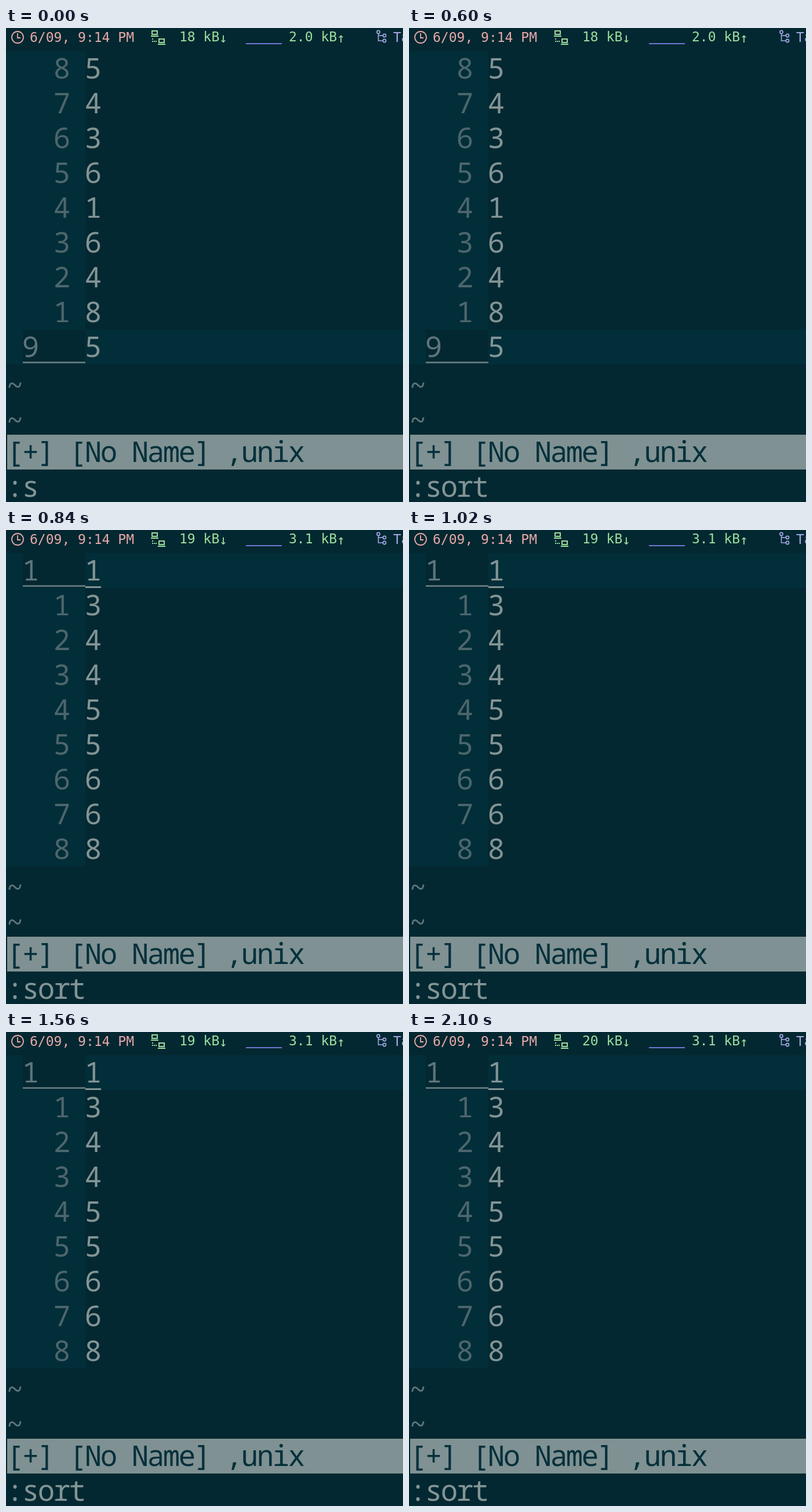
An HTML page with a canvas for the animation above (2.16 s loop, 685 by 817 pixels).

```html
<!DOCTYPE html>
<html lang="en">
<head>
<meta charset="utf-8">
<title>Sorting lines</title>
<style>
html, body { margin: 0; width: 100%; height: 100%; overflow: hidden; background: #032831; }
canvas { display: block; }
</style>
</head>
<body>
<canvas id="stage" width="685" height="817"></canvas>
<script>
const ctx = document.getElementById('stage').getContext('2d');
const LOOP = 2160, SORT_AT = 660;
const CELL = 27, ROW = 60, LEFT = 2, TOP = 40;
const BIG = '300 49px "Noto Sans Mono", "DejaVu Sans Mono", monospace';
const SMALL = '23px "DejaVu Sans Mono", monospace';
const C = {
  bg: '#032831', shade: '#022e39', text: '#839495', dim: '#4c666c', current: '#5d757a',
  status: '#7f9192', statusText: '#04303b',
  pink: '#e6a9a9', green: '#9bdf9d', lilac: '#a5a9e6', graph: '#7077d2'
};
const values = [5, 4, 3, 6, 1, 6, 4, 8, 5];
const sorted = [...values].sort((a, b) => a - b);

function box(x, y, w, h, color) {
  ctx.fillStyle = color;
  ctx.fillRect(x, y, w, h);
}

// Each character sits in the middle of its terminal cell.
function cells(str, col, row, color, dy = 0) {
  ctx.font = BIG;
  ctx.textAlign = 'center';
  ctx.fillStyle = color;
  [...String(str)].forEach((ch, i) =>
    ctx.fillText(ch, LEFT + (col + i + 0.5) * CELL, TOP + row * ROW + 48 + dy));
}

function label(str, x, y, color) {
  ctx.font = SMALL;
  ctx.textAlign = 'left';
  ctx.fillStyle = color;
  ctx.fillText(str, x, y);
}

function line(color, width, ...pts) {
  ctx.strokeStyle = color;
  ctx.lineWidth = width;
  ctx.beginPath();
  pts.forEach(([x, y]) => ctx.lineTo(x, y));
  ctx.stroke();
}

function ring(x, y, r, color, width) {
  ctx.strokeStyle = color;
  ctx.lineWidth = width;
  ctx.beginPath();
  ctx.arc(x, y, r, 0, Math.PI * 2);
  ctx.stroke();
}

function computer(x, y) {
  ctx.strokeStyle = C.green;
  ctx.lineWidth = 2;
  ctx.strokeRect(x + 1, y + 1, 9, 6);
  line(C.green, 2, [x - 1, y + 10], [x + 12, y + 10]);
}

function topBar(t) {
  ring(20, 16, 10, C.pink, 1.8);
  line(C.pink, 1.8, [20, 9], [20, 17], [25, 17]);
  label('6/09, 9:14 PM', 41, 24, C.pink);

  computer(251, 4);
  computer(263, 18);
  for (let i = 0; i < 3; i++) box(252 + i * 3, 22, 2, 2, C.green);
  box(252, 18, 2, 2, C.green);

  const down = t < 840 ? 18 : t < 1840 ? 19 : 20;
  label(down + ' kB', 299, 23, C.green);
  label('↓', 368, 25, C.green);
  box(414, 26, 62, 2, C.graph);
  label((t < 840 ? '2.0' : '3.1') + ' kB', 488, 23, C.green);
  label('↑', 571, 25, C.green);

  ring(642.5, 7, 2.6, C.lilac, 1.6);
  ring(653, 13, 2.6, C.lilac, 1.6);
  ring(653, 22, 2.6, C.lilac, 1.6);
  line(C.lilac, 1.6, [642.5, 10], [642.5, 22], [650, 22]);
  line(C.lilac, 1.6, [642.5, 13], [650, 13]);
  label('Ta', 668, 24, C.lilac);
}

function buffer(done) {
  const list = done ? sorted : values;
  const cur = done ? 0 : list.length - 1;
  const y = TOP + cur * ROW;
  box(0, TOP, 137, list.length * ROW, C.shade);
  box(137, y, 548, ROW, C.shade);
  box(29, y, 108, ROW, C.bg);
  list.forEach((n, i) => {
    if (i === cur) cells(i + 1, 1, i, C.current, -1);
    else cells(Math.abs(i - cur), 3, i, C.dim, -1);
    cells(n, 5, i, C.text, -1);
  });
  box(29, y + 55, 108, 3, C.current);
  if (done) box(137, y + 57, 27, 3, C.text);
}

function draw(t) {
  box(0, 0, 685, 817, C.bg);
  topBar(t);
  buffer(t >= SORT_AT);
  cells('~', 0, 9, C.current, 6);
  cells('~', 0, 10, C.current, 6);
  box(2, 701, 683, 60, C.status);
  cells('[+] [No Name] ,unix', 0, 11, C.statusText);
  const typed = Math.min(4, 1 + Math.floor(t / 120));
  cells(':' + 'sort'.slice(0, typed), 0, 12, C.text);
}

const start = performance.now();
function tick() {
  draw((performance.now() - start) % LOOP);
  requestAnimationFrame(tick);
}
tick();
</script>
</body>
</html>
```
